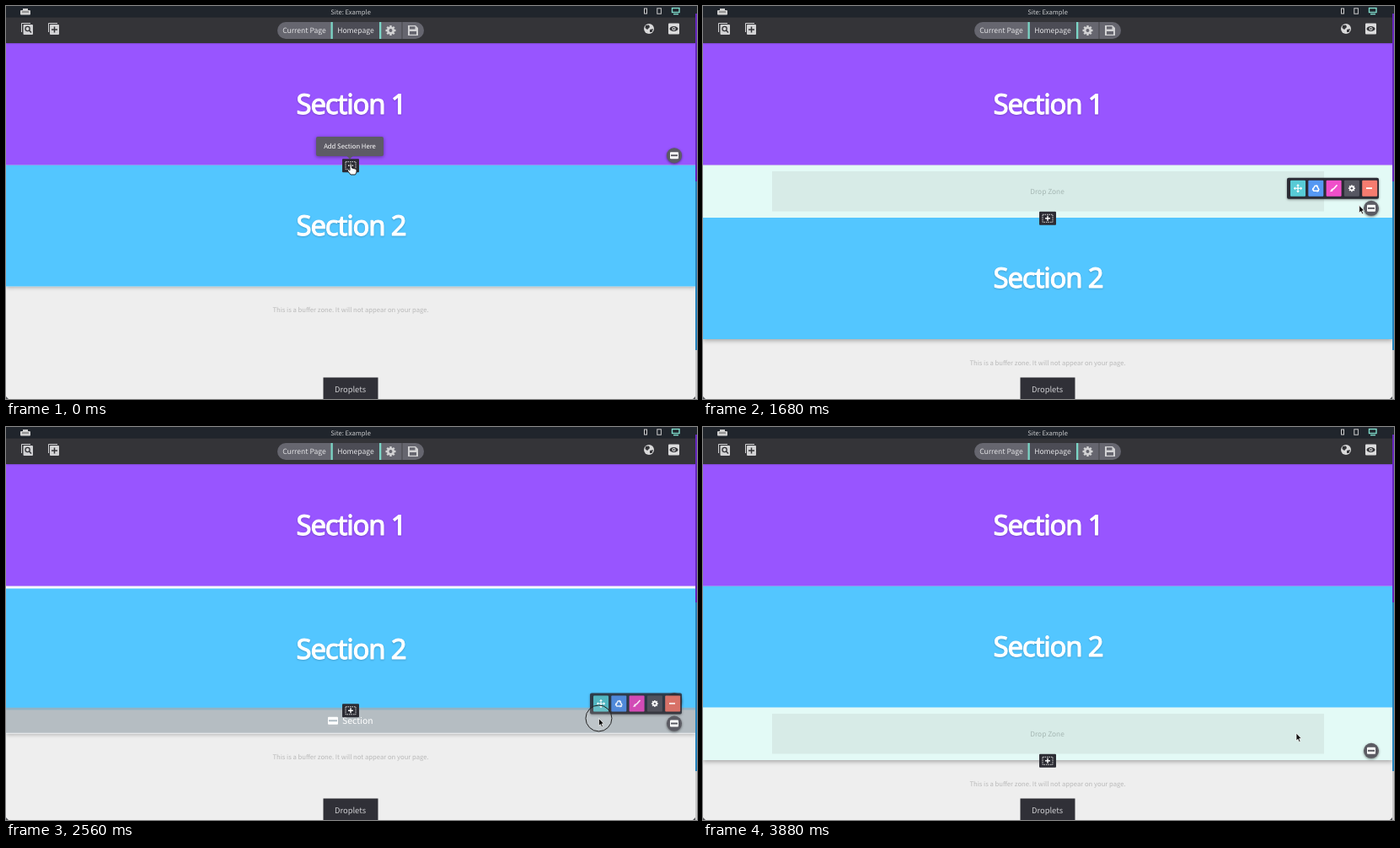
An HTML page with a canvas that plays this animation: 820x466 px, repeating every 3.92 s.

```html
<!DOCTYPE html>
<html>
<head>
<meta charset="utf-8">
<style>
html, body { margin: 0; width: 100%; height: 100%; overflow: hidden; background: #eee; }
canvas { display: block; }
</style>
</head>
<body>
<canvas id="stage" width="820" height="466"></canvas>
<script>
const ctx = document.getElementById('stage').getContext('2d');
ctx.textRendering = 'geometricPrecision';

const LOOP = 3920, WIDTH = 818, S1_END = 188.4, SECTION_H = 144, ZONE_H = 62.6, ROW_H = 31;
const UI = '"Noto Sans CJK SC", "Noto Sans CJK JP", "Noto Sans CJK", sans-serif';
const HEAD = '"Noto Sans", "Open Sans", sans-serif';

// Cursor tip: time, x, y
const cursorKeys = [
  [0, 409, 187], [350, 410, 188], [760, 411, 189], [1240, 759, 234], [1300, 759, 234],
  [1500, 793, 240], [1620, 793, 240], [1860, 704, 217], [2100, 704, 217], [2399, 704, 222],
  [2400, 704, 321], [2700, 703, 365], [2820, 703, 365], [3000, 704, 363]
];
// Bottom edge of the dragged row: time, y
const rowKeys = [
  [2080, 251], [2240, 235], [2399, 235], [2400, 335], [2700, 385], [2820, 385], [3000, 395]
];

const smooth = p => p * p * (3 - 2 * p);
const ramp = (t, a, b) => smooth(Math.min(1, Math.max(0, (t - a) / (b - a))));

function track(keys, t) {
  if (t <= keys[0][0]) return keys[0].slice(1);
  for (let i = 1; i < keys.length; i++) {
    if (t < keys[i][0]) {
      const a = keys[i - 1], b = keys[i], p = ramp(t, a[0], b[0]);
      return a.slice(1).map((v, k) => v + (b[k + 1] - v) * p);
    }
  }
  return keys[keys.length - 1].slice(1);
}

function rect(x, y, w, h, color, r = 0) {
  ctx.fillStyle = color;
  ctx.beginPath();
  ctx.roundRect(x, y, w, h, r);
  ctx.fill();
}

function disc(x, y, r, color) {
  ctx.fillStyle = color;
  ctx.beginPath();
  ctx.arc(x, y, r, 0, 7);
  ctx.fill();
}

function poly(points, color, outline) {
  ctx.beginPath();
  points.forEach(([x, y]) => ctx.lineTo(x, y));
  ctx.closePath();
  ctx.fillStyle = color;
  ctx.fill();
  if (outline) {
    ctx.strokeStyle = outline;
    ctx.lineWidth = 1;
    ctx.stroke();
  }
}

function line(color, width, ...pts) {
  ctx.strokeStyle = color;
  ctx.lineWidth = width;
  ctx.beginPath();
  pts.forEach(([x, y]) => ctx.lineTo(x, y));
  ctx.stroke();
}

function frame(x, y, w, h, color, width = 1) {
  ctx.strokeStyle = color;
  ctx.lineWidth = width;
  ctx.strokeRect(x, y, w, h);
}

function label(str, x, y, size, color, align = 'center') {
  ctx.font = `${size}px ${UI}`;
  ctx.textAlign = align;
  ctx.fillStyle = color;
  ctx.fillText(str, x, y);
}

// Runs a drawing with its own alpha and offset
function layer(alpha, x, y, draw) {
  if (alpha <= 0) return;
  ctx.save();
  ctx.globalAlpha *= alpha;
  ctx.translate(x, y);
  draw();
  ctx.restore();
}

function withShadow(blur, dy, color, draw) {
  ctx.save();
  ctx.shadowBlur = blur;
  ctx.shadowOffsetY = dy;
  ctx.shadowColor = color;
  draw();
  ctx.restore();
}

function gear(x, y, r, color, hole) {
  for (let i = 0; i < 4; i++) {
    const a = i * Math.PI / 4, dx = Math.cos(a) * r, dy = Math.sin(a) * r;
    line(color, r * 0.4, [x - dx, y - dy], [x + dx, y + dy]);
  }
  disc(x, y, r * 0.75, color);
  disc(x, y, r * 0.33, hole);
}

function windowIcon(x, y, w, h, gap) {
  rect(x - w / 2, y - h / 2, w, h, '#fff', 1);
  rect(x - w / 2 + 1, y - 1, w - 2, 2, gap);
}

function heading(str, baseline) {
  ctx.save();
  ctx.font = `500 33px ${HEAD}`;
  ctx.letterSpacing = '-1.2px';
  ctx.textAlign = 'center';
  ctx.fillStyle = ctx.strokeStyle = '#fff';
  ctx.lineWidth = 1.1;
  ctx.lineJoin = 'round';
  withShadow(2, 1, 'rgba(0,0,0,.25)', () => ctx.strokeText(str, 409.5, baseline));
  ctx.fillText(str, 409.5, baseline);
  ctx.restore();
}

function tooltip(str, x, y, w) {
  const color = '#5d5b65';
  withShadow(4, 1, 'rgba(0,0,0,.4)', () => rect(x - w / 2, y - 11.5, w, 23, color, 2));
  poly([[x - 4, y + 11], [x + 4, y + 11], [x, y + 15]], color);
  label(str, x, y + 2.8, 7.7, '#fff');
}

function plusButton(edge) {
  const y = edge + 0.8;
  rect(399, y - 8, 20, 16, '#2c2c34', 1);
  ctx.setLineDash([1.5, 1]);
  frame(403, y - 4.5, 12, 9, '#ddd');
  ctx.setLineDash([]);
  line('#fff', 1.4, [406, y], [412, y]);
  line('#fff', 1.4, [409, y - 3], [409, y + 3]);
}

function roundButton(edge) {
  const y = edge - 11.2;
  withShadow(3, 1, 'rgba(0,0,0,.5)', () => disc(793, y, 9, '#5b5b63'));
  windowIcon(793, y, 10, 8, '#5b5b63');
}

function sectionTools(edge, hover) {
  const y = edge - 34.8;
  withShadow(3, 1, 'rgba(0,0,0,.4)', () => rect(693, y - 12.5, 109, 25, '#2b2c35', 2));
  const colors = [hover ? '#3d9ca2' : '#58cbd6', '#5698f3', '#f04fca', '#575762', '#f67c70'];
  colors.forEach((c, i) => rect(697 + i * 21.3, y - 9.5, 18, 19, c, 1));
  const w = '#fff';
  line(w, 1.2, [701.5, y], [710.5, y]);
  line(w, 1.2, [706, y - 4.5], [706, y + 4.5]);
  for (let i = 0; i < 4; i++) {
    layer(1, 706, y, () => {
      ctx.rotate(i * Math.PI / 2);
      poly([[5, 0], [3, -2], [3, 2]], w);
    });
    if (i < 3) layer(1, 727.3, y + 0.5, () => {
      ctx.rotate(i * Math.PI * 2 / 3);
      line(w, 1.5, [-3, 0], [-1, -3.5], [1.2, -3.5]);
      poly([[0.6, -5], [3, -3], [0.6, -1.8]], w);
    });
  }
  line(w, 1.6, [752.5, y - 4], [748, y + 1]);
  poly([[748.5, y], [747, y + 3.5], [744, y + 4], [746, y + 0.5]], w);
  gear(769.9, y, 4, w, colors[3]);
  rect(787, y - 1, 7, 1.8, w);
}

function header() {
  rect(0, 0, 820, 14, '#20252c');
  withShadow(2, 0, 'rgba(0,0,0,.4)', () => rect(0, 13.5, WIDTH, 30.5, '#343438'));
  label('Site: Example', 409, 9.8, 7.6, '#c9cbcd');
  rect(17, 5, 12, 5.5, '#d0d0d0', 1);
  rect(20, 3, 6, 2, '#d0d0d0');
  rect(19, 6.5, 8, 1, '#555');
  frame(757.5, 3, 3, 6, '#ccc');
  frame(772.8, 2.8, 4.6, 6.4, '#ccc');
  frame(790.5, 2.5, 8.5, 5, '#7fdccb', 1.4);
  rect(792, 9, 6, 1.3, '#7fdccb');

  const pale = '#d2d2d4', dark = '#343438';
  line(pale, 1, [18.5, 31], [18.5, 20.5], [29, 20.5]);
  rect(20.5, 22, 11.5, 12, pale, 1);
  ctx.strokeStyle = dark;
  ctx.lineWidth = 1.3;
  ctx.beginPath();
  ctx.arc(25.6, 27, 2.6, 0, 7);
  ctx.stroke();
  line(dark, 1.4, [27.5, 29], [30, 31.5]);
  line(pale, 1, [50.5, 31], [50.5, 20.5], [61, 20.5]);
  rect(52, 22, 11, 12, pale, 1);
  line(dark, 1.5, [54, 28], [61, 28]);
  line(dark, 1.5, [57.5, 24.5], [57.5, 31.5]);

  rect(322, 19, 174, 20, '#66666f', 10);
  rect(387, 19, 57, 20, '#4c4c55');
  rect(385.5, 19, 2.3, 20, '#7bd5c6');
  rect(443, 19, 2.3, 20, '#7bd5c6');
  rect(469.5, 19, 1, 20, '#44444b');
  label('Current Page', 354, 32.2, 8.6, '#e2e2e5');
  label('Homepage', 415, 32.2, 8.6, '#e2e2e5');
  gear(456.5, 29, 6, pale, '#66666f');
  poly([[477, 23], [486, 23], [489, 26], [489, 35], [477, 35]], pale);
  rect(479, 24.3, 6.5, 3.2, '#66666f');
  rect(479, 30, 8, 3.8, '#66666f');

  disc(763, 27, 6, '#d9d9da');
  poly([[759, 23], [763, 22.5], [764, 25], [761, 28], [758.5, 26]], dark);
  poly([[764, 28], [768, 27], [766.5, 31], [764, 31]], dark);
  rect(786, 20.5, 13, 13, '#dcdcdd', 1);
  ctx.fillStyle = dark;
  ctx.beginPath();
  ctx.ellipse(792.5, 27, 5, 3, 0, 0, 7);
  ctx.fill();
  disc(792.5, 27, 2.1, '#dcdcdd');
  disc(792.5, 27, 1, dark);
}

function edges() {
  rect(WIDTH, 9, 2, 199, '#6425bd');
  rect(WIDTH, 208, 2, 200, '#2483bd');
  rect(WIDTH, 408, 2, 58, '#c9c9c9');
  poly([[0, 463], [3, 466], [0, 466]], '#55565a');
  poly([[818, 463], [815, 466], [818, 466]], '#55565a');
}

function dropZone(top, h, alpha) {
  layer(alpha, 0, 0, () => {
    ctx.beginPath();
    ctx.rect(0, top, WIDTH, h);
    ctx.clip();
    rect(0, top, WIDTH, h, '#e3faf6');
    if (h > 15) rect(82, top + 7.6, 655, h - 15.2, '#d7ebe7');
    label('Drop Zone', 408.5, top + 34.9, 8.4, '#a6b8b4');
  });
}

function rowLabel(y) {
  windowIcon(388, y, 12, 9, '#aebcc4');
  label('Section', 399, y + 3.9, 10.4, '#fff', 'left');
}

function row(bottom, x, alpha) {
  layer(alpha, x, 0, () => {
    rect(-x, bottom - 30, WIDTH, 30, 'rgba(164,174,180,.78)');
    rowLabel(bottom - 14.5);
  });
}

function pointHand(x, y) {
  poly([[x - 1, y], [x + 1, y], [x + 1.5, y + 5], [x + 7, y + 6.5], [x + 7, y + 10], [x + 5.5, y + 13],
    [x, y + 13], [x - 4, y + 8], [x - 3, y + 6.5], [x - 1, y + 8]], '#fff', '#222');
}

function openHand(x, y) {
  poly([[x - 3, y - 5], [x - 1.5, y - 5], [x - 0.5, y - 1], [x, y - 6], [x + 1.5, y - 6], [x + 2, y - 1],
    [x + 3, y - 5], [x + 4.5, y - 4], [x + 4.5, y + 3], [x + 3, y + 7], [x - 2, y + 7],
    [x - 5, y + 2], [x - 4.5, y], [x - 2, y + 1.5]], '#fff', '#222');
}

function arrow(x, y) {
  poly([[x, y], [x, y + 9], [x + 2, y + 7.2], [x + 3.5, y + 10.5], [x + 5, y + 9.8],
    [x + 3.6, y + 6.6], [x + 6, y + 6.3]], '#111', 'rgba(255,255,255,.7)');
}

function cursor(t) {
  const [x, y] = track(cursorKeys, t);
  layer(ramp(t, 2100, 2180) * (1 - ramp(t, 2790, 2870)), 0, 0, () => {
    disc(x, y, 15.5, 'rgba(255,255,255,.12)');
    ctx.strokeStyle = '#222';
    ctx.lineWidth = 1;
    ctx.stroke();
  });
  if (t < 800 || (t > 1470 && t < 1660)) pointHand(x, y);
  else if (t > 1800 && t < 2120) openHand(x, y + 1);
  else arrow(x, y);
}

function draw(t) {
  const opening = ramp(t, 400, 620), shrink = ramp(t, 2080, 2240);
  const swap = ramp(t, 2400, 2600), grow = ramp(t, 2800, 3000);
  const gap = ZONE_H * opening - (ZONE_H - ROW_H) * (shrink - grow);
  const s2 = S1_END + gap * (1 - swap), s2End = s2 + SECTION_H;
  const pageEnd = S1_END + SECTION_H + gap;
  const dragAlpha = ramp(t, 2080, 2200) * (1 - ramp(t, 2810, 2970));
  const toolAlpha = ramp(t, 1480, 1600) * (1 - ramp(t, 2810, 2970)) * (1 - 0.15 * shrink);
  const shift = -1.5 * ramp(t, 2600, 2700) * (1 - grow);
  const ghost = t >= 2400 ? 0.2 * Math.max(0, 1 - (t - 2400) / 120) : 0;

  // Bottom of the hovered section: first section, drop zone, dragged row, dropped zone
  const rowEnd = track(rowKeys, t)[0];
  const hoverEnd = t < 840 ? S1_END : t < 2080 ? s2 : t < 3000 ? rowEnd : pageEnd;

  rect(0, 0, 820, 466, '#eeeeee');
  withShadow(5, 2, 'rgba(0,0,0,.3)', () => rect(0, 44, WIDTH, pageEnd - 44, '#fff'));
  if (swap > 0) rect(0, s2End, WIDTH, pageEnd - s2End, `rgba(238,243,245,${0.8 * swap})`);
  dropZone(swap < 0.5 ? S1_END : s2End, gap, 1 - shrink + grow);
  rect(0, s2, WIDTH, SECTION_H, '#53c6ff');
  withShadow(2, 0, 'rgba(0,0,0,.3)', () => rect(0, 44, WIDTH, S1_END - 44, '#9855ff'));
  heading('Section 1', 127.5);
  heading('Section 2', s2 + 83.2);
  label('This is a buffer zone. It will not appear on your page.', 409, pageEnd + 30.7, 7.7, '#b9b9b9');

  layer(swap * (1 - grow), 0, 0, () => rowLabel(s2End + 16));
  if (ghost) {
    row(235, 0, ghost);
    layer(ghost, 0, 0, () => { sectionTools(235, false); roundButton(235); });
    layer(ghost * 2.5, 0, 0, () => plusButton(235));
  }
  row(rowEnd, shift, dragAlpha);

  const overSecond = t >= 2400 && t < 2620;
  if (overSecond) roundButton(s2End);
  if (overSecond) plusButton(s2End);
  else if (t < 2400) plusButton(hoverEnd);
  else if (t >= 2960) plusButton(pageEnd);

  layer(1, shift, 0, () => {
    layer(toolAlpha, 0, 0, () => sectionTools(hoverEnd, t > 1800 && t < 2120));
    roundButton(hoverEnd);
  });
  layer(1 - ramp(t, 380, 480), 0, 0, () => tooltip('Add Section Here', 408, 166.5, 80));
  layer(ramp(t, 1860, 1940) * (1 - ramp(t, 2080, 2150)), 0, 0,
    () => tooltip('Drag Section', 705, 192, 62));

  rect(376.5, 440.5, 65, 26, '#303037');
  label('Droplets', 408.5, 457.8, 9.4, '#cfcfd2');
  header();
  edges();
  cursor(t);
}

function tick() {
  draw(performance.now() % LOOP);
  requestAnimationFrame(tick);
}
tick();
</script>
</body>
</html>
```
